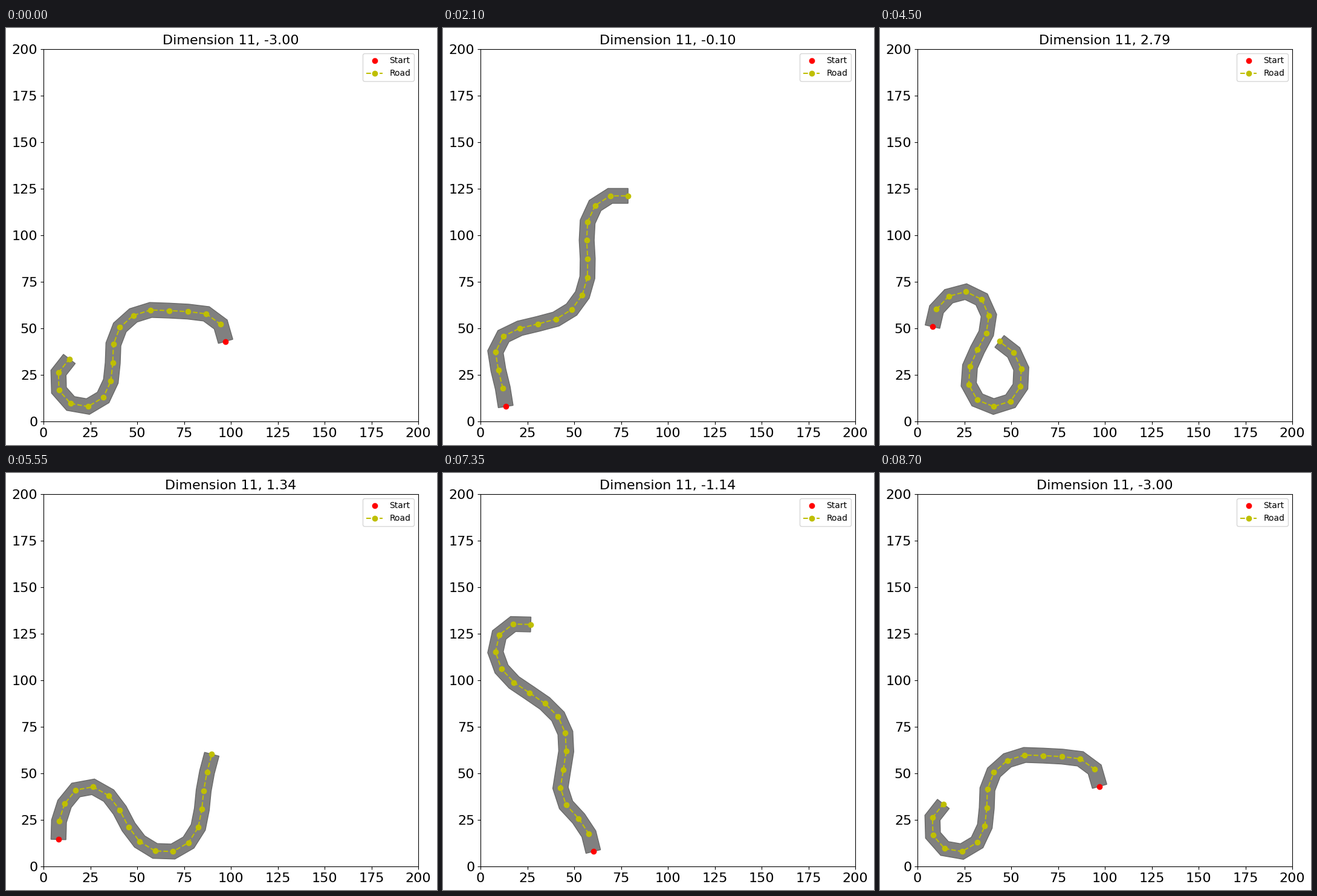
Animation of 713x690 px, one loop 8.85 s. Source, as a matplotlib script:

```python
import matplotlib.pyplot as plt
import numpy as np
from matplotlib.animation import FuncAnimation

STEPS = 30          # latent values swept from -3 to 3, then back
VALUES = np.linspace(-3, 3, STEPS)
SEGMENTS = np.arange(16)
MARGIN = 8          # gap between the road's centre line and the axes
HALF_WIDTH = 4

# Key headings in degrees: one row per key step, one column per key segment.
KEY_STEPS = np.array([0, 5, 14, 20, 28])
KEY_SEGMENTS = np.array([0, 2, 4, 6, 8, 10, 12, 15])
HEADINGS = np.array([
    [106, 173, 178, 222, 268, 245, 170, 52],
    [106, 155, 127, 156, 200, 193, 135, 18],
    [99, 99, 26, 15, 54, 89, 87, 0],
    [90, 57, -23, -53, -21, 38, 81, 65],
    [77, 15, -66, -118, -94, -22, 56, 142],
])


def smooth(knots, values, t):
    """Cubic Hermite curve through the key values."""
    slopes = np.gradient(values, knots, axis=0)
    k = np.clip(np.searchsorted(knots, t, side="right") - 1, 0, len(knots) - 2)
    h = knots[k + 1] - knots[k]
    u = (t - knots[k]) / h
    return ((1 + 2 * u) * (1 - u) ** 2 * values[k]
            + u * (1 - u) ** 2 * h * slopes[k]
            + u * u * (3 - 2 * u) * values[k + 1]
            + u * u * (u - 1) * h * slopes[k + 1])


def road_points(step):
    heading = smooth(KEY_SEGMENTS, smooth(KEY_STEPS, HEADINGS, step), SEGMENTS)
    length = 10.1 - 0.017 * np.abs(np.gradient(heading))  # shorter in bends
    angle = np.radians(heading)
    moves = np.column_stack([np.cos(angle), np.sin(angle)]) * length[:, None]
    pts = np.vstack([[0, 0], np.cumsum(moves, axis=0)])
    return pts - pts.min(axis=0) + MARGIN


def road_outline(pts):
    """Flat-capped, mitred outline around the centre line."""
    d = np.diff(pts, axis=0)
    d /= np.hypot(d[:, 0], d[:, 1])[:, None]
    normal = np.column_stack([-d[:, 1], d[:, 0]])
    a = np.vstack([normal[:1], normal])
    b = np.vstack([normal, normal[-1:]])
    mitre = (a + b) / (1 + np.sum(a * b, axis=1))[:, None] * HALF_WIDTH
    return np.vstack([pts + mitre, (pts - mitre)[::-1]])


W, H, DPI = 713, 690, 100
plt.rcParams["font.family"] = "DejaVu Sans"
fig = plt.figure(figsize=(W / DPI, H / DPI), dpi=DPI, facecolor="white")
ax = fig.add_axes([62 / W, 39 / H, 620 / W, 616 / H])
ax.set(xlim=(0, 200), ylim=(0, 200),
       xticks=range(0, 201, 25), yticks=range(0, 201, 25))
ax.tick_params(labelsize=16)
title = ax.set_title("", fontsize=16)

start, = ax.plot([], [], "ro", label="Start")
road, = ax.plot([], [], "yo--", label="Road")
surface = plt.Polygon(np.zeros((3, 2)), fc="gray", ec="dimgray")
ax.add_patch(surface)
ax.legend(loc="upper right", fontsize=10)


def update(frame):
    step = STEPS - 1 - abs(frame - (STEPS - 1))
    pts = road_points(step)
    surface.set_xy(road_outline(pts))
    start.set_data(pts[:1, 0], pts[:1, 1])
    road.set_data(pts[1:, 0], pts[1:, 1])
    title.set_text(f"Dimension 11, {VALUES[step]:.2f}")
    return surface, start, road, title


anim = FuncAnimation(fig, update, frames=2 * STEPS - 1, interval=150,
                     repeat=True, repeat_delay=0, blit=False)
plt.show()
```
